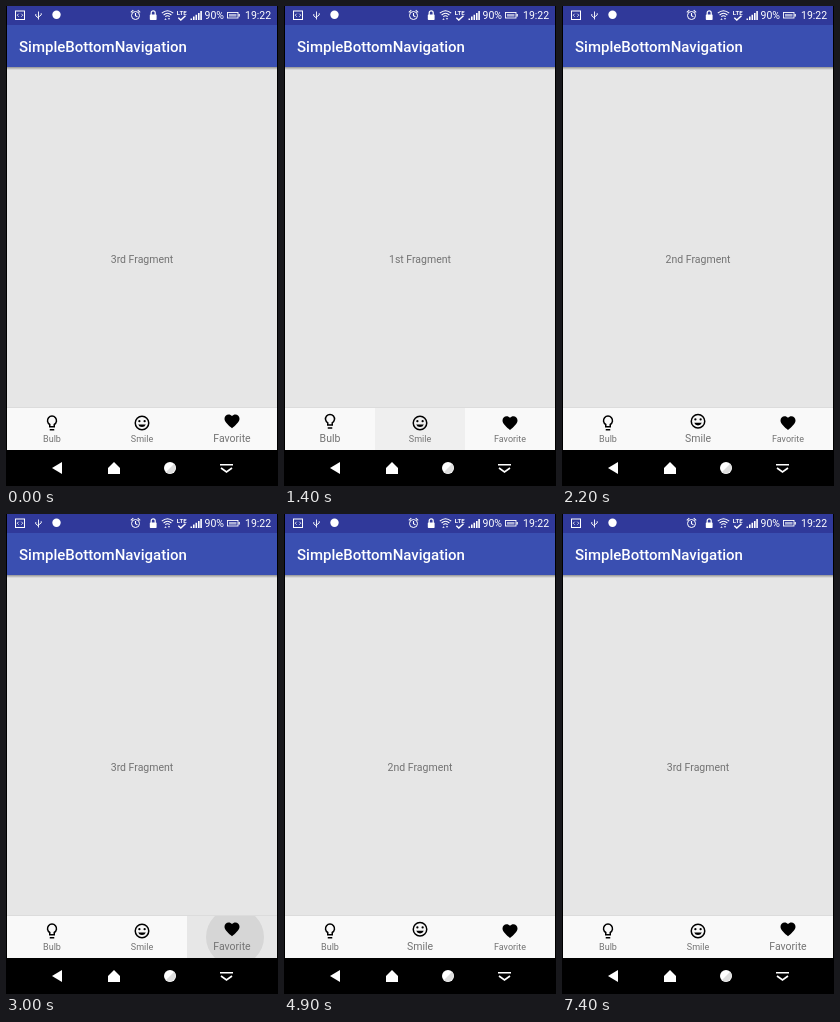
Recreate the animation shown at these times as an HTML page. Size 272 by 480 pixels, loop 7.8 s.

```html
<!DOCTYPE html>
<html lang="en">
<head>
<meta charset="utf-8">
<title>Bottom navigation</title>
<style>
  html, body { margin: 0; width: 100%; height: 100%; overflow: hidden; background: #000; }
  svg { display: block; width: 272px; height: 480px; }
  text { font-family: Roboto, "Noto Sans", sans-serif; }
  .mid { text-anchor: middle; fill: #737373; }
  .line { fill: none; stroke: #fff; }
  .icon { fill: none; stroke: #000; stroke-width: 2; }
  .solid { fill: #000; stroke: none; }
</style>
</head>
<body>
<svg viewBox="0 0 272 480">
  <defs>
    <linearGradient id="shade" x2="0" y2="1">
      <stop stop-color="#000" stop-opacity=".36"/>
      <stop offset="1" stop-color="#000" stop-opacity="0"/>
    </linearGradient>
    <clipPath id="cell"><rect id="cellBox" y="402" width="90" height="42"/></clipPath>
  </defs>

  <rect width="272" height="480"/>
  <rect x="1" y="61" width="270" height="341" fill="#e6e6e6"/>
  <rect x="1" y="61" width="270" height="3" fill="url(#shade)"/>
  <rect x="1" y="19" width="270" height="42" fill="#3a4fb1"/>
  <rect x="1" width="270" height="19" fill="#30399a"/>

  <!-- status bar -->
  <g fill="#fff">
    <g class="line">
      <rect x="9.5" y="5" width="9" height="8.5"/>
      <path d="M12.7 7.7l-1.5 1.5 1.5 1.5M15.3 7.7l1.5 1.5-1.5 1.5" stroke-width=".8"/>
      <path d="M32.5 5.5v8M32.5 12l-2.7-2V8M32.5 11l2.7-2V7.2" stroke-width=".9"/>
      <circle cx="129.5" cy="9.5" r="4"/>
      <path d="M129.5 7v2.7l2 1.2M124.8 6.3l2.5-2.2M134.2 6.3l-2.5-2.2" stroke-width="1.1"/>
      <path d="M145.2 9V6.8a2 2 0 0 1 4 0V9" stroke-width="1.2"/>
      <path d="M155.8 7.2q5.7-5 11.4 0M157.6 9q3.9-3.4 7.8 0M159.3 10.7q2.2-1.9 4.4 0" stroke-width="1.1"/>
      <path d="M172.3 11.8l2.5 2.3 4.7-4.4" stroke-width="1.4"/>
      <rect x="221.5" y="6.5" width="10.5" height="5.5" stroke-width=".9"/>
    </g>
    <circle cx="50.5" cy="8.7" r="4.2"/>
    <rect x="143.8" y="8.4" width="6.8" height="5.6" rx=".7"/>
    <path d="M159.5 12l1.2 2h-2.4zM163 14l1.2-2h-2.4z" opacity=".8"/>
    <text x="170.8" y="8.8" font-size="6" font-weight="700">LTE</text>
    <path d="M184.5 14v-1.6h1.6V14zM187 14v-3.4h1.6V14zM189.5 14V8.8h1.6V14zM192 14V7h1.6v7zM194.3 14V5h1.6v9z"/>
    <rect x="223" y="8" width="7.5" height="2.6" opacity=".6"/>
    <rect x="232.5" y="8" width="1.3" height="2.6"/>
    <text x="198.5" y="13" font-size="10.5">90%</text>
    <text x="239" y="13" font-size="10.5">19:22</text>
    <text x="13" y="45.5" font-size="15" font-weight="500">SimpleBottomNavigation</text>
  </g>

  <text id="page" class="mid" x="136" y="256.5" font-size="10.5"></text>

  <!-- bottom bar -->
  <rect x="1" y="401" width="270" height="1" fill="#dcdcdc"/>
  <rect x="1" y="402" width="270" height="42" fill="#f9f9f9"/>
  <g clip-path="url(#cell)">
    <rect id="tint" x="1" y="402" width="270" height="42"/>
    <circle id="ripple"/>
  </g>
  <g class="tab">
    <g class="icon"><path d="M9 17v-3a6 6 0 1 1 6 0v3zM9 21h6"/></g>
    <text class="mid" x="46">Bulb</text>
  </g>
  <g class="tab">
    <g class="icon">
      <circle cx="12" cy="12" r="9"/>
      <g class="solid">
        <circle cx="8.5" cy="9.5" r="1.5"/><circle cx="15.5" cy="9.5" r="1.5"/>
        <path d="M6.9 14a5.5 5.5 0 0 0 10.2 0z"/>
      </g>
    </g>
    <text class="mid" x="136">Smile</text>
  </g>
  <g class="tab">
    <g class="icon"><path class="solid" d="M12 21.35l-1.45-1.32C5.4 15.36 2 12.28 2 8.5 2 5.42 4.42 3 7.5 3c1.74 0 3.41.81 4.5 2.09C13.09 3.81 14.76 3 16.5 3 19.58 3 22 5.42 22 8.5c0 3.78-3.4 6.86-8.55 11.54z"/></g>
    <text class="mid" x="226">Favorite</text>
  </g>

  <!-- system keys -->
  <g fill="#fff">
    <path d="M46 462l10-6v12z"/>
    <path d="M102 462l6-6 6 6v6h-12z"/>
    <circle cx="164" cy="462" r="6"/>
    <path d="M168.2 457.8a6 6 0 0 1-8.4 8.4z" fill="#dedede"/>
    <path class="line" d="M214 458.7h13M215 462l5.5 4 5.5-4" stroke-width="1.6"/>
  </g>
</svg>
<script>
const LOOP = 7800, STEP = 100;
const pages = ["1st Fragment", "2nd Fragment", "3rd Fragment"];

// tab, press time, delay until selected, press style, ripple centre
const taps = [
  { tab: 0, at: 100, delay: 200, hold: true, x: 46, y: 425 },
  { tab: 1, at: 1400, delay: 300, hold: true, x: 136, y: 425 },
  { tab: 2, at: 2800, delay: 100, hold: false, x: 229, y: 423 },
  { tab: 1, at: 4100, delay: 100, hold: false, x: 136, y: 425 },
  { tab: 0, at: 5400, delay: 200, hold: true, x: 46, y: 425 },
  { tab: 2, at: 6600, delay: 100, hold: false, x: 229, y: 423 }
];

// one value per step after the press
const press = {
  long: { tint: [.04, .09, .135, .145, .11, .07, .03, 0], r: [0, 0, 0, 13, 30, 48, 60, 0], ring: [0, 0, 0, .025, .04, .03, .015, 0] },
  short: { tint: [.04, .08, .075, .07, .055, .04, .02, 0], r: [0, 0, 29, 45, 60, 70, 70, 0], ring: [0, 0, .075, .07, .05, .03, .015, 0] }
};

const $ = id => document.getElementById(id);
const set = (el, attrs) => { for (const k in attrs) el.setAttribute(k, attrs[k]); };
const tabs = [...document.querySelectorAll(".tab")];

function draw(time) {
  const t = Math.floor(time % LOOP / STEP) * STEP;
  let active = 2, tap = taps[0];
  for (const p of taps) {
    if (t >= p.at) tap = p;
    if (t >= p.at + p.delay) active = p.tab;
  }
  $("page").textContent = pages[active];

  tabs.forEach((tab, i) => {
    const on = i === active;
    set(tab.children[0], { transform: `translate(${37 + 90 * i} ${on ? 406.3 : 408}) scale(.75)` });
    set(tab.children[1], { y: on ? 436 : 435.5, "font-size": on ? 10.5 : 9 });
  });

  const k = (t - tap.at) / STEP;
  const style = tap.hold ? press.long : press.short;
  set($("cellBox"), { x: 1 + 90 * tap.tab });
  set($("tint"), { opacity: style.tint[k] || 0 });
  set($("ripple"), { cx: tap.x, cy: tap.y, r: style.r[k] || 0, opacity: style.ring[k] || 0 });
}

const start = performance.now();
function tick() {
  draw(performance.now() - start);
  requestAnimationFrame(tick);
}
tick();
</script>
</body>
</html>
```
